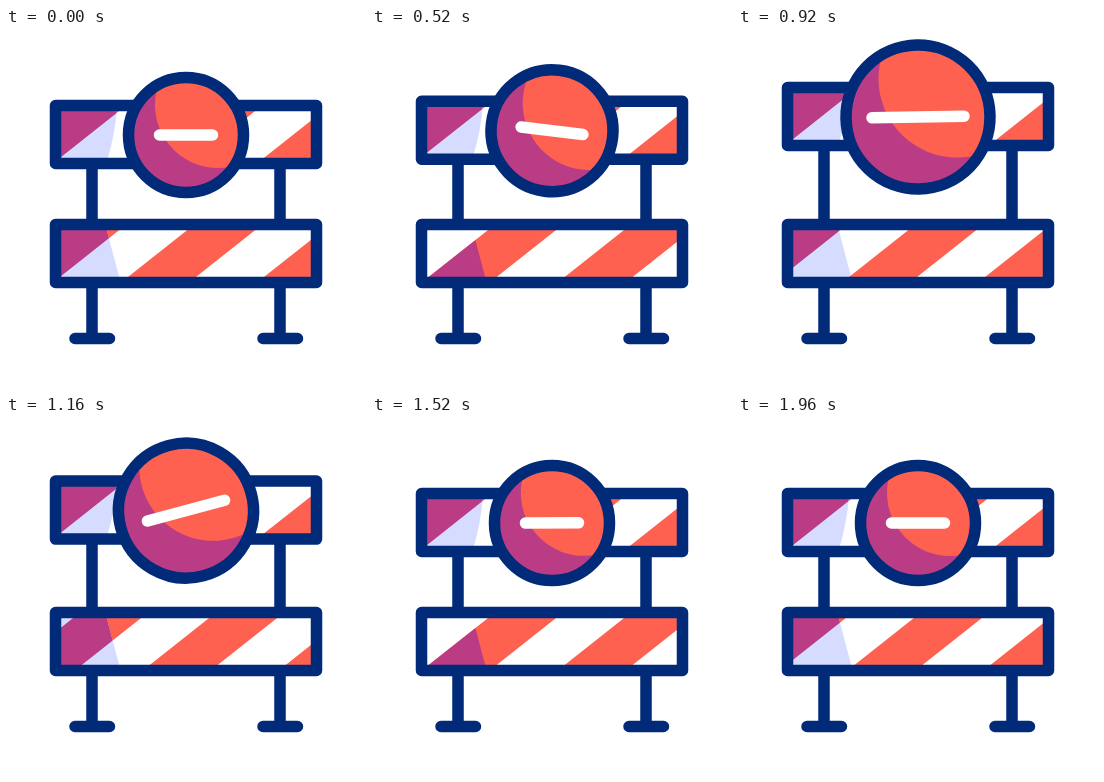
These frames come from a looping animation (360x360 px, 2000 ms). An HTML page:

```html
<!DOCTYPE html>
<html lang="en">
<head>
<meta charset="utf-8">
<title>Road barrier</title>
<style>
  html, body { margin: 0; width: 100%; height: 100%; overflow: hidden; background: #fff; }
  svg { display: block; width: 100vw; height: 100vh; }
  .ink { fill: none; stroke: #012a78; stroke-width: 11.5; stroke-linecap: round; stroke-linejoin: round; }
  .red { fill: #ff6150; }
  .purple { fill: #ba3c85; }
  .tint { fill: #d6dcff; }
</style>
</head>
<body>
<svg viewBox="0 0 360 360">
  <defs>
    <!-- Boards are drawn with the inner top edge at y = 0 -->
    <clipPath id="panel"><path d="M52-3H308V50H52Z"/></clipPath>
    <clipPath id="upperShade"><path d="M52-3H111Q109 24 101 50H52Z"/></clipPath>
    <clipPath id="lowerShade"><path d="M52-3H100Q106 20 114 50H52Z"/></clipPath>
    <clipPath id="disc"><circle id="discClip" cx="0" cy="0" r="57.5"/></clipPath>
    <path id="stripes"/>
  </defs>

  <path class="ink" d="M86 110V310M69 310.5H103.500M274 110V310M257 310.500H291.500"/>

  <g id="upper">
    <path fill="#fff" d="M50-5H310V53H50Z"/>
    <g clip-path="url(#panel)"><use href="#stripes" class="red"/></g>
    <g clip-path="url(#upperShade)">
      <path class="tint" d="M50-5H120V53H50Z"/>
      <use href="#stripes" class="purple"/>
    </g>
    <path class="ink" d="M49.500-5.500H310.500V52.500H49.500Z"/>
  </g>

  <g transform="translate(0 202)">
    <path fill="#fff" d="M50-5H310V53H50Z"/>
    <g clip-path="url(#panel)"><use href="#stripes" class="red moving"/></g>
    <g clip-path="url(#lowerShade)">
      <path id="lowerTint" class="tint" d="M50-5H120V53H50Z"/>
      <use href="#stripes" class="purple moving"/>
    </g>
    <path class="ink" d="M49.500-5.500H310.500V52.500H49.500Z"/>
  </g>

  <g id="sign">
    <g clip-path="url(#disc)">
      <path class="purple" d="M-90-90H90V90H-90Z"/>
      <circle id="light" class="red"/>
    </g>
    <path id="bar" fill="none" stroke="#fff" stroke-width="11.5" stroke-linecap="round"/>
    <circle id="rim" class="ink"/>
  </g>
</svg>
<script>
  const LOOP = 2000, PERIOD = 136, LAPS = 2;
  const RISE = 310, PEAK = 920, FALL = 1530;
  const SWING = [[0, 0], [310, 0], [700, 12], [1150, -15], [1560, 0], [LOOP, 0]];

  const $ = id => document.getElementById(id);
  const set = (el, attrs) => {
    for (const name in attrs) el.setAttribute(name, attrs[name]);
  };
  const clamp = x => Math.min(1, Math.max(0, x));
  const ease = x => x < 0.5 ? 2 * x * x : 1 - 2 * (1 - x) ** 2;

  function keyed(keys, t) {
    const i = keys.findIndex(key => key[0] > t);
    const [t0, a] = keys[i - 1], [t1, b] = keys[i];
    return a + (b - a) * ease((t - t0) / (t1 - t0));
  }

  let stripePath = '';
  for (let i = -3; i <= 1; i++) {
    const x = 181 + i * PERIOD;
    stripePath += `M${x + 4} -3H${x + 72}L${x + 5} 50H${x - 63}Z`;
  }
  $('stripes').setAttribute('d', stripePath);
  const moving = document.querySelectorAll('.moving');

  function draw(t) {
    const shift = t / LOOP * LAPS * PERIOD % PERIOD;
    moving.forEach(el => set(el, { transform: `translate(${shift} 0)` }));
    // The pale tint drops out during the middle of each stripe pass
    set($('lowerTint'), { fill: '', visibility: shift > 32 && shift < 72 ? 'hidden' : 'visible' });

    const grow = ease(clamp(t < PEAK ? (t - RISE) / (PEAK - RISE) : (FALL - t) / (FALL - PEAK)));
    const lift = 18 * grow;
    const radius = 57.5 + 14.5 * grow;
    const scale = radius / 57.5;
    const half = 26.5 + 19.5 * grow;

    set($('upper'), { transform: `translate(0 ${83 - lift})` });
    set($('sign'), { transform: `translate(180 ${107 - lift}) rotate(${keyed(SWING, t)})` });
    set($('rim'), { r: radius });
    set($('discClip'), { r: radius });
    set($('light'), { cx: 32 * scale, cy: -30 * scale, r: 63 * scale });
    set($('bar'), { d: `M${-half} 0H${half}` });
  }

  const start = performance.now();
  function tick() {
    draw((performance.now() - start) % LOOP);
    requestAnimationFrame(tick);
  }
  tick();
</script>
</body>
</html>
```
